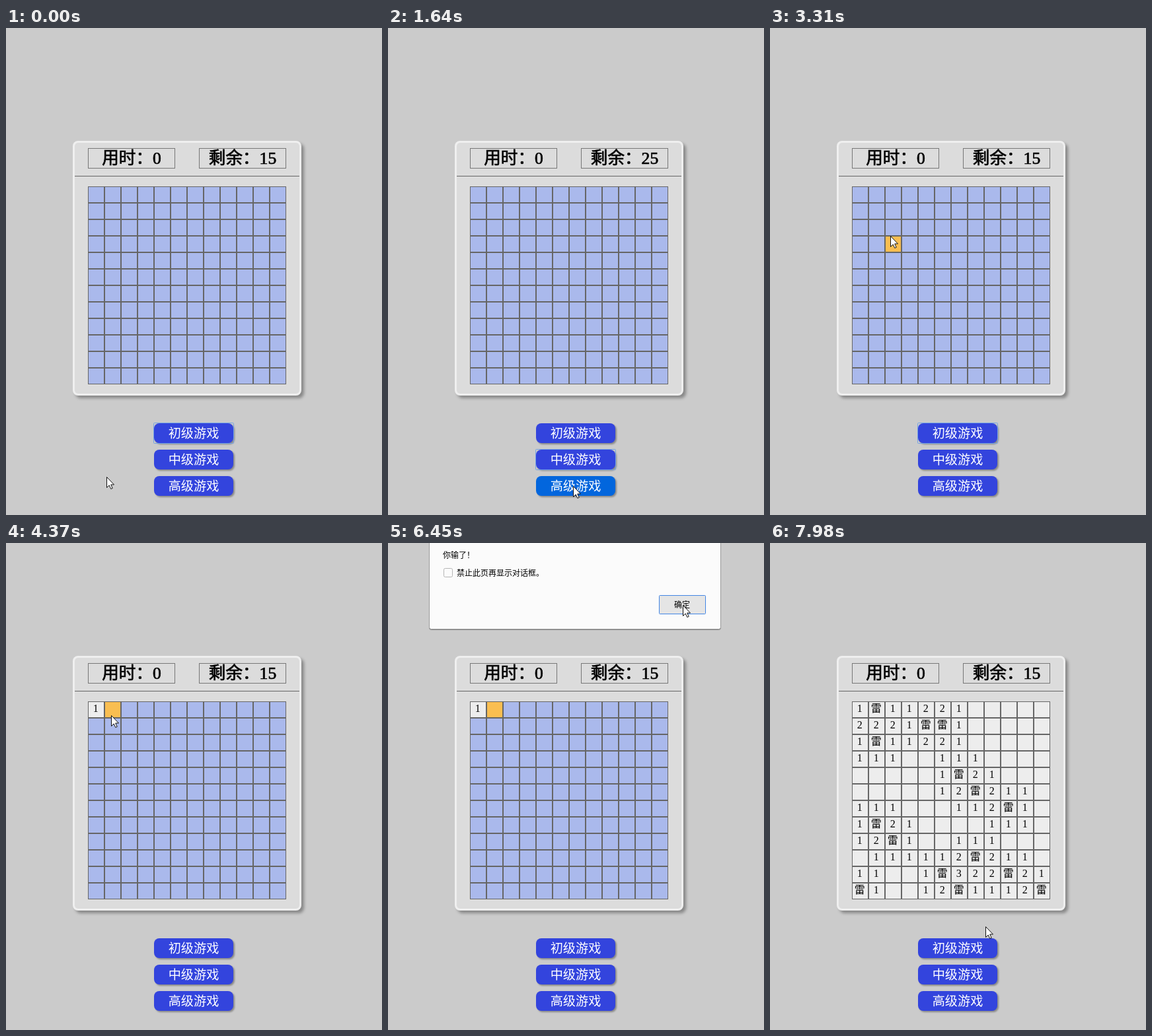
An HTML page that plays this animation: 569 by 738 pixels, repeating every 8000 ms.

```html
<!DOCTYPE html>
<html lang="zh-CN">
<head>
<meta charset="utf-8">
<title>扫雷</title>
<style>
html, body { margin: 0; width: 100%; height: 100%; overflow: hidden; background: #cbcbcb; }
svg { display: block; width: 100%; height: 100%; }
text { font-family: "Liberation Serif", "Noto Sans CJK SC", "Noto Sans CJK", serif; }
.title { font-size: 25.6px; text-anchor: middle; stroke: #000; stroke-width: .7px; }
.button { font-size: 19.2px; fill: #fff; text-anchor: middle; }
.cell { font-size: 16px; text-anchor: middle; }
.dialog { font-family: "Noto Sans CJK SC", "Noto Sans CJK", sans-serif; font-size: 12px; }
</style>
</head>
<body>
<svg id="stage" viewBox="0 0 569 738"></svg>
<script>
const LOOP = 8000, STEP = 140, SIZE = 12, CELL = 25, LEFT = 124, TOP = 240;
const COLOR = { closed: '#aab9ec', open: '#ededed', hover: '#f9be51', button: '#3344dd', active: '#0266dd' };
const LEVELS = ['初级游戏', '中级游戏', '高级游戏'];

// A star is a mine
const MAP = `
.*..........
....**......
.*..........
............
......*.....
.......*....
.........*..
.*..........
..*.........
.......*....
.....*...*..
*.....*....*`.trim().split('\n');

// Each click picks the next level, the last one wraps to the first
const LEVEL_CLICKS = [0, 1370, 1900, 2600];
const FIRST_OPEN = 3690, DIALOG_ON = 4650, DIALOG_OFF = 6600;

// Pointer path: start, end, target x, target y
const MOVES = [
  [280, 670, 292, 642], [940, 1090, 283, 656], [1500, 1640, 280, 694],
  [2050, 2340, 280, 622], [3020, 3300, 182, 315], [3430, 3560, 143, 250],
  [4220, 4360, 159, 261], [4780, 4780, 159, 265], [4930, 5610, 440, 129],
  [5760, 6150, 446, 94], [6730, 7440, 430, 147], [7560, 7980, 326, 581]
];

const stage = document.getElementById('stage');

function add(tag, attrs, parent = stage, content = '') {
  const el = document.createElementNS('http://www.w3.org/2000/svg', tag);
  for (const key in attrs) el.setAttribute(key, attrs[key]);
  el.textContent = content;
  return parent.appendChild(el);
}
const rect = (x, y, width, height, attrs, parent) => add('rect', { x, y, width, height, ...attrs }, parent);
const text = (x, y, cls, content, parent) => add('text', { x, y, class: cls }, parent, content);
const show = (el, on) => el.setAttribute('visibility', on ? 'visible' : 'hidden');
const shadow = (x, y, blur) => `filter:drop-shadow(${x}px ${y}px ${blur}px #888)`;
const inside = (p, x, y, w, h) => p.x >= x && p.x < x + w && p.y >= y && p.y < y + h;
const isMine = (row, col) => MAP[row]?.[col] === '*';

function mineCount(row, col) {
  let n = 0;
  for (let r = row - 1; r <= row + 1; r++)
    for (let c = col - 1; c <= col + 1; c++) n += isMine(r, c);
  return n;
}

function titleBox(x, content) {
  rect(x + .5, 182.5, 131, 30, { fill: 'none', stroke: '#777' });
  return text(x + 66, 206, 'title', content);
}

// Panel
rect(0, 0, 569, 738, { fill: '#cbcbcb' });
rect(101, 171, 346, 386, { rx: 8, fill: '#efefef', style: shadow(4, 4, 2) });
rect(104, 174, 340, 380, { rx: 5, fill: '#dcdcdc' });
rect(104, 224, 340, 1, { fill: '#666' });
titleBox(124, '用时：0');
const left = titleBox(292);

// Board
const cells = [];
for (let i = 0; i < SIZE * SIZE; i++) {
  const col = i % SIZE, row = (i - col) / SIZE;
  const x = LEFT + col * CELL, y = TOP + row * CELL;
  const box = rect(x + .5, y + .5, CELL - 1, CELL - 1, { stroke: '#666' });
  const label = text(x + 11.8, y + 16, 'cell', isMine(row, col) ? '雷' : mineCount(row, col) || '');
  cells.push({ x, y, box, label });
}

// Level buttons
const buttons = LEVELS.map((name, i) => {
  const y = 599 + i * 40;
  const box = rect(224, y, 120, 30, { rx: 8, style: shadow(2, 2, 1) });
  const ring = rect(223.5, y - .5, 121, 31, { rx: 1, fill: 'none', stroke: '#75a3e4' });
  text(284, y + 21.5, 'button', name);
  return { y, box, ring };
});

// Dialog
const dialog = add('g', {});
rect(62.5, -10, 441, 140.5, { rx: 3, fill: '#fbfbfb', stroke: '#9a9a9a', style: shadow(0, 1, .5) }, dialog);
text(83, 23, 'dialog', '你输了！', dialog);
rect(84.5, 38.5, 13, 13, { rx: 2, fill: '#fbfbfb', stroke: '#b5b5b5' }, dialog);
text(104, 50, 'dialog', '禁止此页再显示对话框。', dialog);
const ok = rect(410.5, 79.5, 70, 28, { rx: 1, stroke: '#4285e4' }, dialog);
text(433, 98, 'dialog', '确定', dialog);

const pointer = add('path', {
  d: 'M.5 .5V16.5L4.2 13L6.8 18.5L9.2 17.4L6.7 12H11.5Z', fill: '#fff', stroke: '#111'
});

// The pointer advances in even jumps, one every STEP
function pointerAt(t) {
  let x = 152, y = 680;
  for (const [start, end, tx, ty] of MOVES) {
    if (t < start) break;
    const jumps = Math.round((end - start) / STEP) + 1;
    const part = Math.min(1, (Math.floor((t - start) / STEP) + 1) / jumps);
    x += (tx - x) * part;
    y += (ty - y) * part;
  }
  return { x: Math.round(x), y: Math.round(y) };
}

function render(t) {
  const p = pointerAt(t);
  const level = (LEVEL_CLICKS.filter(c => c <= t).length - 1) % LEVELS.length;
  const modal = t >= DIALOG_ON && t < DIALOG_OFF;
  const target = modal ? pointerAt(DIALOG_ON) : p; // hover freezes behind the dialog

  left.textContent = '剩余：' + (15 + 10 * level);
  cells.forEach(({ x, y, box, label }, i) => {
    const open = t >= DIALOG_OFF || (i === 0 && t >= FIRST_OPEN);
    const hover = inside(target, x, y, CELL, CELL);
    box.setAttribute('fill', open ? COLOR.open : hover ? COLOR.hover : COLOR.closed);
    show(label, open);
  });
  buttons.forEach(({ y, box, ring }, i) => {
    box.setAttribute('fill', inside(target, 224, y, 120, 30) ? COLOR.active : COLOR.button);
    show(ring, i === level && t < FIRST_OPEN);
  });
  show(dialog, modal);
  ok.setAttribute('fill', inside(p, 410, 79, 71, 29) ? '#e5e5e5' : '#fdfdfd');
  pointer.setAttribute('transform', `translate(${p.x} ${p.y})`);
}

const began = performance.now();
function tick() {
  render((performance.now() - began) % LOOP);
  requestAnimationFrame(tick);
}
tick();
</script>
</body>
</html>
```
